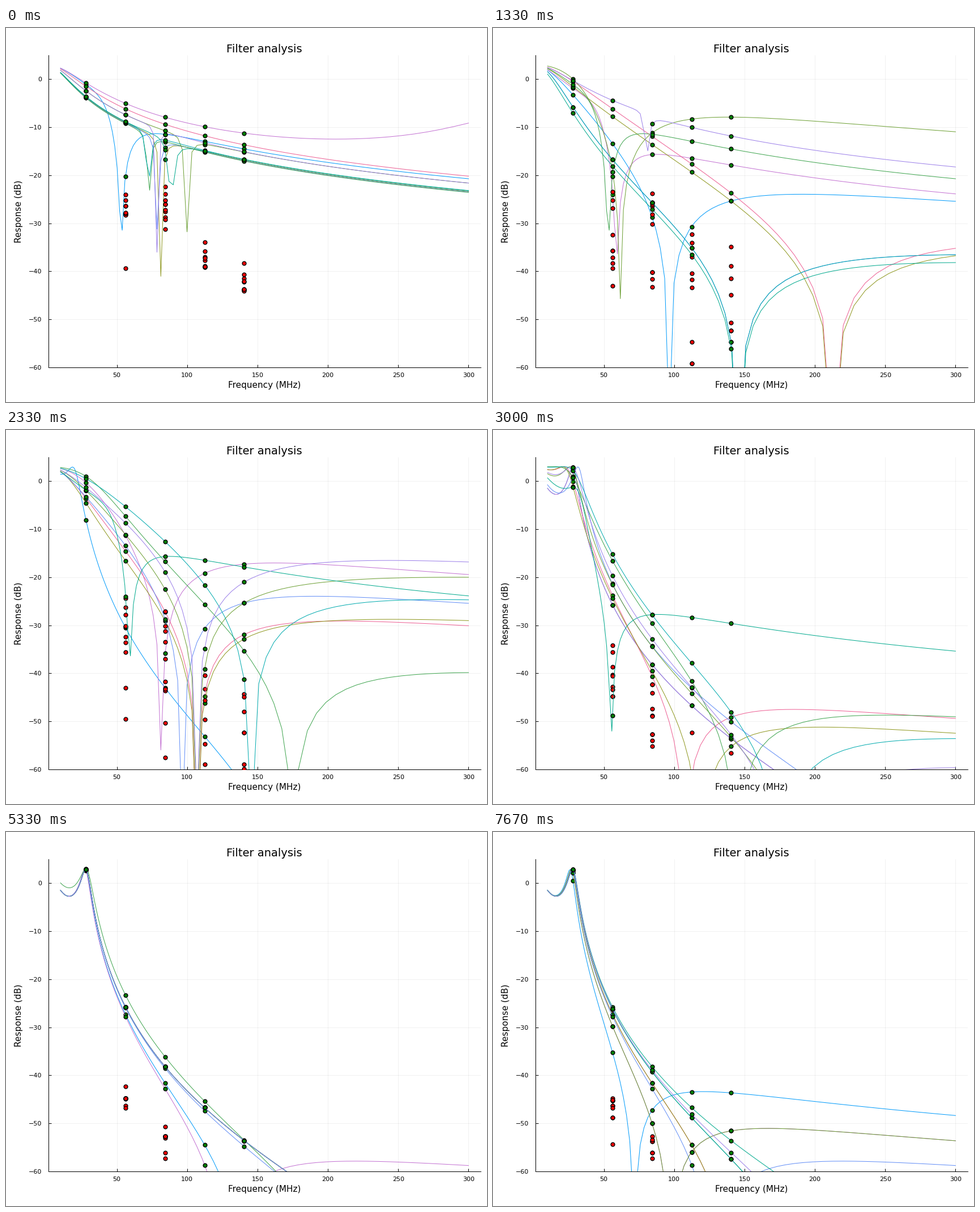
A matplotlib script that plays this animation: 849 by 660 pixels, repeating every 8 s.

```python
import numpy as np
import matplotlib.pyplot as plt
from matplotlib.animation import FuncAnimation

W, H, DPI = 849, 660, 100
FRAMES, LOOP = 24, 8000
BASE = 28.11                                   # fundamental, MHz
FREQ = np.geomspace(10, 300, 100)
HARM = BASE * np.arange(1, 6)
EMISSION = np.array([-19, -14.5, -24, -27])    # harmonic levels before filtering
R0, Q = 50, 500
COLORS = ["#009afa", "#c371d2", "#ed5e93", "#8e971e", "#618df6",
          "#6c9f33", "#3ea44e", "#00aaae", "#00a98d", "#9b7fe9"]


def pi(cap, ind, zero, out=None):
    """Gain in dB of a pi filter (pF, nH) whose coil is tuned to a zero (MHz)."""
    s = 2j * np.pi * FREQ * 1e6
    y1 = s * cap * 1e-12 * R0
    y2 = y1 if out is None else s * out * 1e-12 * R0
    x = FREQ / zero
    z = s * ind * 1e-9 / R0 / (1 - x ** 2 + 1j * x / Q)
    chain = (1 + z * y1) + (1 + z * y2) + z + (y1 + y2 + z * y1 * y2)
    return 20 * np.log10(2 * np.sqrt(2) / abs(chain))


def shunt(cap, ind, zero):
    """Almost a bare capacitor, with a narrow dip at the zero."""
    return pi(cap, ind, zero, 0)


def tuned(zero):
    """The winning ladder; only its zero still moves."""
    return pi(470, 120, zero, 560)


# designs that survive several generations
trap54 = pi(304, 82, 53.1, 5)
trap59 = pi(350, 85, 58.95, 22)
trap97 = pi(33, 1000, 96.6)
deep146 = pi(100, 1200, 145.7, 10)
trap108 = pi(221, 326, 107.7)
trap119 = pi(230, 345, 119)
smooth = pi(437, 109, 290)
best, best141, best128, best98, best200 = map(tuned, (300, 141, 128, 97.8, 200))

# one population per stage, in palette order
POPS = [
    [trap54, pi(238, 6.4, 900, 34), shunt(306, 0.1, 900),
     shunt(442, 8, 81.4), shunt(447, 8, 78.9), shunt(361, 5, 99.6),
     shunt(452, 8, 72.6), shunt(434, 8, 72.3), shunt(432, 8, 88.6),
     shunt(361, 5, 78.5)],
    [trap97, trap59, pi(23.5, 700, 213), pi(23.5, 840, 213), deep146,
     pi(24, 520, 61.5), trap54, deep146, pi(100, 1390, 145.7, 11),
     shunt(245, 5.6, 80.2)],
    [pi(330, 330, 173, 390), pi(33, 630, 81.55), pi(68, 1000, 107.1, 22),
     pi(100, 1000, 107.1, 10), trap97, pi(52, 810, 107.1, 5),
     pi(56, 560, 175.5, 47), pi(25, 575, 145.7), trap59,
     pi(18, 755, 107.1)],
    [best, best, trap108, trap119, smooth, pi(281, 220, 190),
     pi(127, 468, 145), pi(143, 366, 176), pi(495, 138, 55.2, 133),
     pi(252, 222, 180)],
    [best141, best, best, best, tuned(250), trap108, trap119,
     pi(336, 229, 148), pi(390, 180, 200), smooth],
    [best141, best128] + [best] * 4 + [pi(390, 150, 216)] + [best] * 3,
    [tuned(71.8), best98, best141, best141, best128, best98,
     best200, best200, best, tuned(220)],
]

# stage reached at each step; designs are replaced in a fixed order
STAGES = ([k / 3 for k in range(12)] + [4 + k / 4 for k in range(4)]
          + [5] * 3 + [5 + 1 / 3] + [5 + 2 / 3] * 3 + [6])
ORDER = [1, 5, 6, 7, 9, 8, 3, 0, 2, 4]


def population(step):
    stage = STAGES[step]
    n = int(stage + 1e-9)
    pop = list(POPS[n])
    for slot in ORDER[:int((stage - n) * 10 + 1e-9)]:
        pop[slot] = POPS[n + 1][slot]
    return pop


plt.rcParams["font.family"] = "DejaVu Sans"
fig = plt.figure(figsize=(W / DPI, H / DPI), dpi=DPI, facecolor="white")
L, R, T, B = 74.6, 838, 47.8, 599.1
ax = fig.add_axes([L / W, 1 - B / H, (R - L) / W, (B - T) / H])
ax.set(xlim=(1.3, 308.7), ylim=(-60, 5),
       xticks=range(50, 301, 50), yticks=range(-60, 1, 10))
ax.spines[["top", "right"]].set_visible(False)
ax.spines[["left", "bottom"]].set_linewidth(0.72)
ax.set_axisbelow(True)
ax.grid(color="black", alpha=0.1, lw=0.4)
ax.tick_params(direction="in", length=3.4, width=0.72, labelsize=8)
ax.tick_params(axis="x", pad=6.4)
ax.tick_params(axis="y", pad=8.2)


def label(x, y, text, size, **kw):
    fig.text(x / W, 1 - y / H, text, size=size, ha="center", **kw)


label(456, 43, "Filter analysis", 14, va="baseline")
label(456, 635, "Frequency (MHz)", 11, va="baseline")
label(23, 323.5, "Response (dB)", 11, va="center", rotation=90)

lines, passed, emitted = [], [], []
dot = dict(ls="", marker="o", ms=4.9, mec="black", mew=1)
for i, color in enumerate(COLORS):
    z = 3 + 3 * i
    lines += ax.plot([], [], color=color, lw=0.72, zorder=z)
    passed += ax.plot([], [], mfc="#008000", zorder=z + 1, **dot)
    emitted += ax.plot([], [], mfc="#ff0000", zorder=z + 2, **dot)


def update(step):
    for line, green, red, db in zip(lines, passed, emitted, population(step)):
        at = np.interp(HARM, FREQ, db)
        line.set_data(FREQ, db)
        green.set_data(HARM, at)
        red.set_data(HARM[1:], at[1:] + EMISSION)
    return lines + passed + emitted


anim = FuncAnimation(fig, update, frames=FRAMES, interval=LOOP / FRAMES,
                     repeat=True, repeat_delay=0, blit=False)
plt.show()
```
